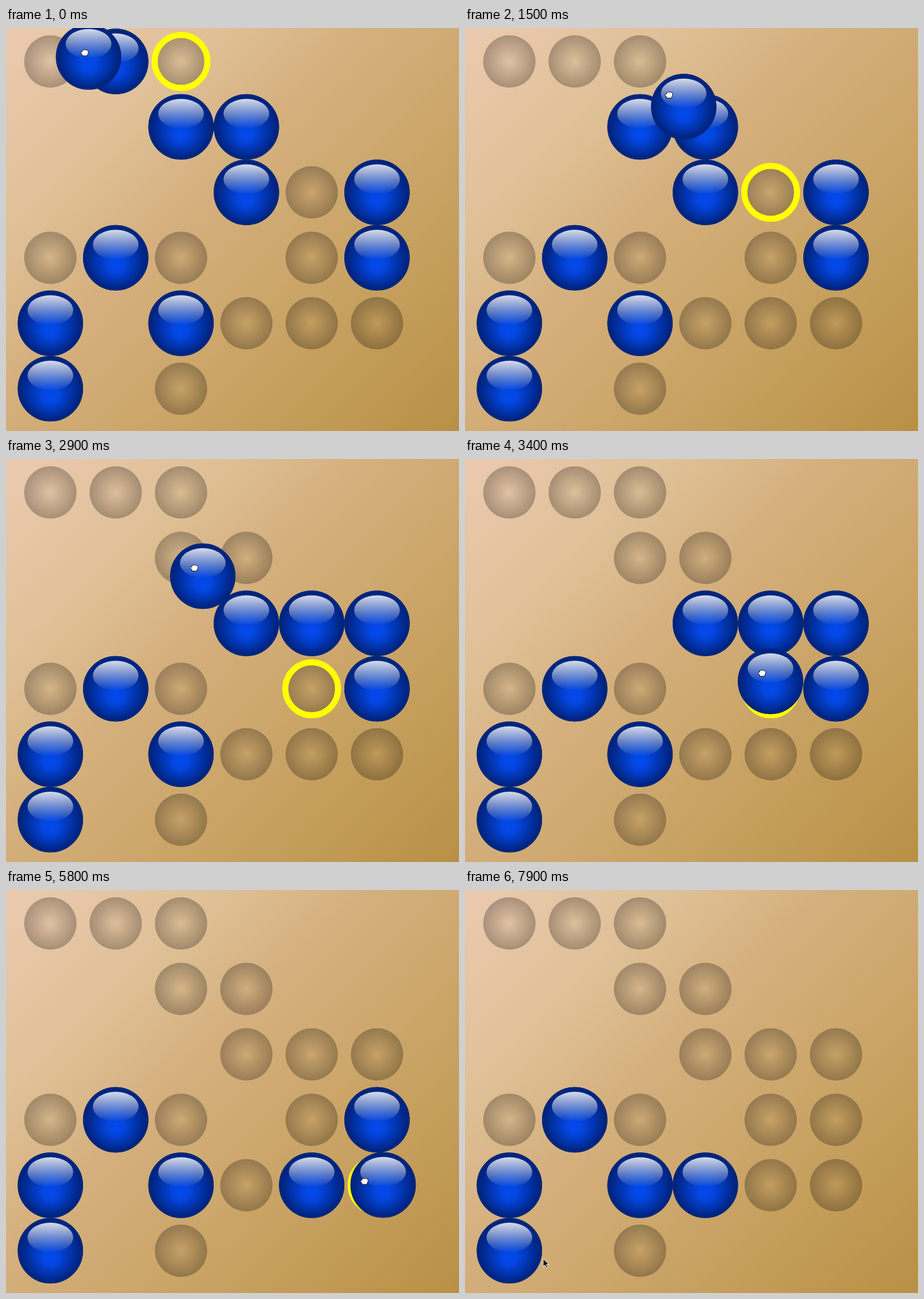
Recreate the animation shown at these times as an HTML page with a canvas. Size 794x705 px, loop 8000 ms.

```html
<!DOCTYPE html>
<html lang="en">
<head>
<meta charset="utf-8">
<title>Peg solitaire</title>
<style>
  html, body { margin: 0; width: 100%; height: 100%; overflow: hidden; }
  body {
    background: linear-gradient(135deg, #ebcab0, #dfc096 25%, #d5b07e 42%,
      #c9a364 68%, #b89045);
  }
  canvas { display: block; }
</style>
</head>
<body>
<canvas width="794" height="705"></canvas>
<script>
const ctx = document.querySelector('canvas').getContext('2d');
const LOOP = 8000, STEP = 100, TAU = Math.PI * 2;
const PITCH = 114.5, BALL = PITCH / 2, HOLE = PITCH * 0.4, LIFT = 8;

// "o" is a ball, "." an empty hole.
const BOARD = ['oo.   ', '  oo  ', '   o.o', '.o. .o', 'o o...', 'o .   '];
const cells = BOARD.flatMap((line, row) =>
  [...line].flatMap((mark, col) => mark === ' ' ? [] : [{ col, row, filled: mark === 'o' }]));

// The ball goes from its hole to the release point between pick and arrive, and
// snaps in at drop; the pointer then reaches the next ball at rest.
const moves = [
  { from: [0, 0], to: [2, 0], release: [301, 54], grab: [-7, -8],
    pick: -150, arrive: 350, drop: 800, rest: 1000 },
  { from: [2, 0], to: [4, 2], release: [511, 289], grab: [-26, -21],
    pick: 1200, arrive: 2000, drop: 2200, rest: 2600 },
  { from: [2, 1], to: [4, 3], release: [535.5, 389], grab: [-15, -15],
    pick: 2800, arrive: 3400, drop: 3500, rest: 3900 },
  { from: [4, 2], to: [4, 4], release: [533, 505], grab: [-12, 13],
    pick: 4100, arrive: 4500, drop: 4600, rest: 5200 },
  { from: [5, 2], to: [5, 4], release: [661, 516], grab: [-33, -7],
    pick: 5300, arrive: 5650, drop: 6000, rest: 6200 },
  { from: [5, 4], to: [3, 4], release: [418, 506], grab: [2, 17],
    pick: 6700, arrive: 7200, drop: 7300, rest: 7700 }
];
const EXIT = [137, 645];

const center = ([col, row]) => [77.8 + PITCH * col, 58.5 + PITCH * row];
const add = (a, b) => a.map((n, i) => n + b[i]);
const mix = (a, b, part) => a.map((n, i) => n + (b[i] - n) * part);
const progress = (time, start, end) => Math.min(1, Math.max(0, (time - start) / (end - start)));
const smooth = p => p * p * (3 - 2 * p);

function gradient(fill, stops) {
  stops.forEach(([offset, color]) => fill.addColorStop(offset, color));
  return fill;
}
const holeFill = gradient(ctx.createRadialGradient(0, 0, 0, 0, 0, HOLE),
  [[0, 'rgba(0,0,0,.02)'], [1, 'rgba(0,0,0,.27)']]);
const ballFill = gradient(ctx.createRadialGradient(0, 16, 0, 0, 0, BALL),
  [[0, '#034aee'], [.25, '#0345de'], [.65, '#0132a8'], [1, '#002074']]);
const shineFill = gradient(ctx.createLinearGradient(0, -49, 0, 3),
  [[0, 'rgba(255,255,255,.84)'], [1, 'rgba(255,255,255,0)']]);

function at([x, y], draw) {
  ctx.save();
  ctx.translate(x, y);
  draw();
  ctx.restore();
}

function ellipse(y, rx, ry, fill) {
  ctx.beginPath();
  ctx.ellipse(0, y, rx, ry, 0, 0, TAU);
  ctx.fillStyle = fill;
  ctx.fill();
}

function ring(radius, width, color) {
  ctx.beginPath();
  ctx.arc(0, 0, radius, 0, TAU);
  ctx.strokeStyle = color;
  ctx.lineWidth = width;
  ctx.stroke();
}

const drawHole = () => ellipse(0, HOLE, HOLE, holeFill);
const drawTarget = () => ring(46.2, 10.6, '#ff0');

function drawBall() {
  ellipse(0, BALL, BALL, ballFill);
  ring(BALL - 1.5, 3, '#00277c');
  ellipse(-23, 40, 26, shineFill);
}

const fist = new Path2D('M-4 6V4L-6.5 1Q-7-1.5-5-1.5L-4-1V-3Q-3.5-5.5-1.5-4Q0-6 1.5-4Q3.5-5.5 4.5-3.5Q6.5-4 6.5-1.5V1L5 4V6Z');
const palm = new Path2D('M-3 7L-4 4-7 0Q-7-2-5-1L-3.5 0-5-5Q-4-7-2.5-5L-1.5-2V-6Q0-8 1-6V-2L2.5-6Q4-7 4.5-5L4-1 5.5-4Q7-4.5 7-3L5 4V7Z');
const arrow = new Path2D('M0 0V14L3.2 11 5.5 16 8 15 5.8 10H10Z');

function drawPointer(shape) {
  const dark = shape === arrow;
  ctx.lineWidth = 1;
  ctx.lineJoin = 'round';
  ctx.fillStyle = dark ? '#111' : '#fff';
  ctx.strokeStyle = dark ? '#fff' : '#111';
  ctx.fill(shape);
  ctx.stroke(shape);
}

function drag({ from, release, pick, arrive }, time) {
  const part = progress(time, pick, arrive);
  const [x, y] = mix(center(from), release, part);
  return [x, y - LIFT * Math.sin(Math.PI * part)];
}

function travel(move, next, time) {
  const end = next ? add(center(next.from), next.grab) : EXIT;
  return mix(add(move.release, move.grab), end, smooth(progress(time, move.drop, move.rest)));
}

function render(time) {
  const filled = new Set(cells.filter(c => c.filled).map(c => `${c.col},${c.row}`));
  const begun = moves.filter(move => time >= move.pick);
  const current = begun.at(-1);
  const dragged = time < current.drop ? drag(current, time) : null;
  const pointer = dragged ? add(dragged, current.grab) : travel(current, moves[begun.length], time);

  for (const { from, to, drop } of begun) {
    filled.delete(`${from}`);
    if (time < drop) continue;
    filled.delete(`${mix(from, to, 0.5)}`);
    filled.add(`${to}`);
  }

  ctx.clearRect(0, 0, 794, 705);
  let shape = dragged ? fist : arrow;
  for (const { col, row } of cells) {
    const spot = center([col, row]), full = filled.has(`${col},${row}`);
    at(spot, full ? drawBall : drawHole);
    const near = Math.hypot(pointer[0] - spot[0], pointer[1] - spot[1]) < BALL;
    if (full && near && !dragged) shape = palm;
  }
  if (dragged) {
    at(center(current.to), drawTarget);
    at(dragged, drawBall);
  }
  at(pointer, () => drawPointer(shape));
}

const start = performance.now();
function tick() {
  const time = (performance.now() - start) % LOOP;
  render(Math.floor(time / STEP) * STEP);
  requestAnimationFrame(tick);
}
tick();
</script>
</body>
</html>
```
